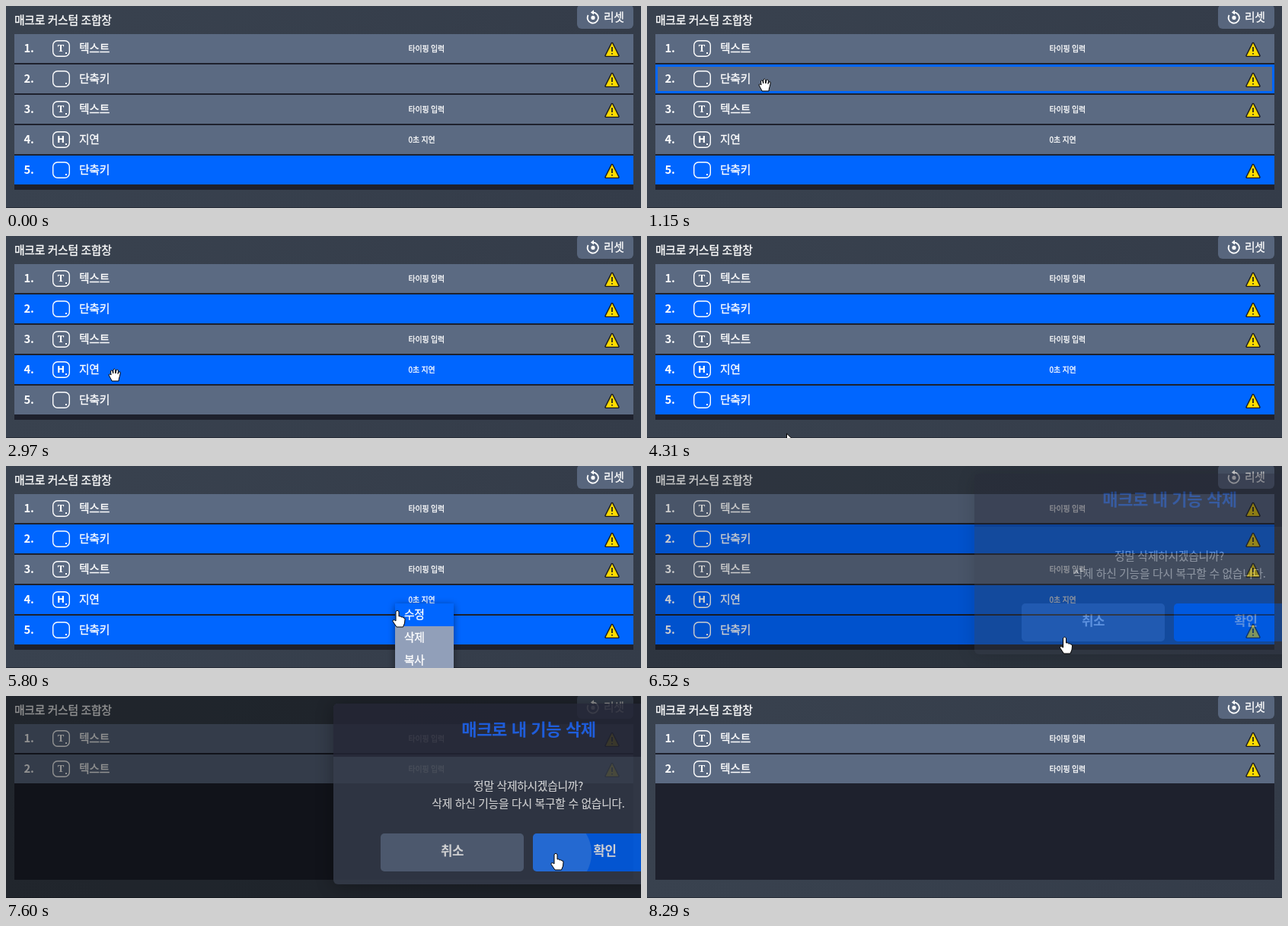
Write an HTML page that moves like this. It is 834 px wide and 266 px high and loops after 8.82 s.

```html
<!DOCTYPE html>
<html lang="ko">
<head>
<meta charset="utf-8">
<style>
  html, body { margin: 0; width: 100%; height: 100%; overflow: hidden; background: #38404d; }
  svg { display: block; width: 834px; height: 266px; }
  text {
    font: 500 14.8px "Noto Sans CJK KR", "Noto Sans CJK", "Noto Sans", sans-serif;
    letter-spacing: -.02em; fill: #fff; stroke: #fff; stroke-width: .3px;
  }
  .bold { font-weight: 700; stroke: none; }
  .small { font-size: 9.9px; letter-spacing: -.01em; }
  .plain { stroke-width: .12px; }
  .key { font-size: 13px; letter-spacing: 0; font-weight: 700; text-anchor: middle; stroke: none; }
  .serif { font-family: "Noto Serif", serif; }
  .sans { font-family: "DejaVu Sans", sans-serif; font-size: 12px; }
  .mid { text-anchor: middle; }
  .heading { font-size: 22.1px; fill: #1a66ff; }
  .button { font-size: 16.8px; }
  #menu { filter: drop-shadow(0 2px 5px rgba(0, 0, 0, .45)); }
  #dialog { filter: drop-shadow(0 2px 12px rgba(0, 0, 0, .4)); }
  #cursor path { fill: #fff; stroke: #000; stroke-linejoin: round; }
</style>
</head>
<body>
<svg viewBox="0 0 834 266">
  <defs>
    <linearGradient id="back">
      <stop stop-color="#39424f"/><stop offset="1" stop-color="#343c49"/>
    </linearGradient>
    <clipPath id="okClip"><rect x="692" y="181" width="188" height="50" rx="5"/></clipPath>
    <g id="warning">
      <path d="M796 49.4 L804 65.4 H788Z" fill="#ffdc00" stroke="#15171e" stroke-width="3.4" stroke-linejoin="round"/>
      <path d="M796 49.4 L804 65.4 H788Z" fill="#ffdc00" stroke="#ffdc00" stroke-width=".6" stroke-linejoin="round"/>
      <path d="M796 54 V60 M796 62 V63.6" stroke="#15171e" stroke-width="1.7"/>
    </g>
  </defs>

  <rect width="834" height="266" fill="url(#back)"/>
  <rect y="265" width="834" height="1" fill="#272d38"/>
  <text x="11" y="23.7">매크로 커스텀 조합창</text>
  <rect x="750" y="-2" width="74" height="32" rx="6" fill="#58667d"/>
  <g fill="none" stroke="#fff" stroke-width="1.8">
    <path d="M764.6 12 A7.1 7.1 0 1 0 771 8.4"/>
    <path d="M772 5.2 V11.6 L767.8 8.4Z" fill="#fff" stroke="none"/>
    <circle cx="771" cy="15.4" r="2.6" fill="#fff" stroke="none"/>
  </g>
  <text x="785" y="20">리셋</text>
  <rect x="11" y="37" width="813" height="205" fill="#1e212d"/>
  <g id="before"></g>
  <g id="after"></g>

  <g id="menu">
    <rect x="511" y="181" width="77" height="100" fill="#919fb9"/>
    <rect id="menuHover" x="511" width="77" height="30" fill="#0066ff"/>
    <text x="523" y="201">수정</text>
    <text x="523" y="231">삭제</text>
    <text x="523" y="261">복사</text>
  </g>

  <rect id="shade" width="834" height="266"/>
  <g id="dialog">
    <rect x="430" y="10" width="514" height="238" rx="6" fill="#363d4c"/>
    <path d="M430 80 V16 Q430 10 436 10 H944 V80Z" fill="#242636"/>
    <text class="bold mid heading" x="686.5" y="51.5">매크로 내 기능 삭제</text>
    <text class="mid plain" x="686" y="124">정말 삭제하시겠습니까?</text>
    <text class="mid plain" x="686" y="147">삭제 하신 기능을 다시 복구할 수 없습니다.</text>
    <rect x="492" y="181" width="188" height="50" rx="5" fill="#5b6a82"/>
    <rect x="692" y="181" width="188" height="50" rx="5" fill="#0066ff"/>
    <circle id="ripple" cx="719" cy="207" fill="#fff" opacity=".16" clip-path="url(#okClip)"/>
    <text class="bold mid button" x="586" y="210.3">취소</text>
    <text class="bold mid button" x="786.5" y="210.3">확인</text>
  </g>

  <g id="cursor">
    <path id="grab" d="M-4 8 C-5 5 -8 1 -8 -.5 Q-7 -2 -5 0 L-5.5 -5 Q-4.5 -7.5 -3 -5 L-2.3 -2 L-2 -7 Q-.6 -9 .6 -7 L.8 -2 L2 -6.5 Q3.6 -8 4.5 -6 L4 -1.5 L5.2 -4 Q7 -5 7.2 -3 C7 1 5 4 5 8Z"/>
    <path id="point" d="M-4 -9.5 Q-2 -12 0 -9.5 L0 -3 Q2 -4 3.2 -2 Q5 -3 6 -1 Q8.5 -1.5 8 1 L7.5 6 L5.5 11 H-3 L-8 3.5 Q-8 0 -4 3Z"/>
    <path id="arrow" d="M-2 -11 V5 L2 1.5 L5 8 L7.5 7 L4.5 .5 H10Z"/>
  </g>
</svg>
<script>
const LOOP = 8820, TICK = 67.4, LEAD = 18;
const $ = id => document.getElementById(id);
const show = (el, on) => { el.style.display = on ? '' : 'none'; };
const ramp = (k, from, to) => Math.min(1, Math.max(0, (k - from) / (to - from)));
const easeOut = u => u * (2 - u);

const TEXT = { key: 'T', face: 'serif', name: '텍스트', note: '타이핑 입력', warn: true };
const HOTKEY = { key: '', face: '', name: '단축키', note: '', warn: true };
const DELAY = { key: 'H', face: 'sans', name: '지연', note: '0초 지연', warn: false };

const rowMarkup = ({ key, face, name, note, warn }, i) => `
  <g transform="translate(0 ${i * 40})">
    <rect x="11" y="37" width="813" height="38" fill="#5b6a82"/>
    <rect class="selected" x="11" y="37" width="813" height="38" fill="#0066ff" opacity="0"/>
    <rect class="hover" x="12.5" y="38.5" width="810" height="35" fill="none" stroke="#0066ff" stroke-width="3" style="display:none"/>
    <text class="bold" x="23.5" y="60.7">${i + 1}.</text>
    <rect x="61.7" y="45.7" width="21.6" height="20.6" rx="6" fill="none" stroke="#fff" stroke-width="1.4"/>
    <text class="key ${face}" x="72" y="60.3">${key}</text>
    <rect x="78" y="61" width="2" height="2" fill="#fff"/>
    <text x="96" y="60.7">${name}</text>
    <text class="small" x="528.5" y="59.7">${note}</text>
    ${warn ? '<use href="#warning"/>' : ''}
  </g>`;

$('before').innerHTML = [TEXT, HOTKEY, TEXT, DELAY, HOTKEY].map(rowMarkup).join('');
$('after').innerHTML = [TEXT, TEXT].map(rowMarkup).join('');
const selected = [...$('before').querySelectorAll('.selected')];
const hover = [...$('before').querySelectorAll('.hover')];

// Cursor glides in ticks: the pointer rests between them.
const GLIDES = [
  { from: 2, to: 12, x: 181, y: 79 },
  { from: 13, to: 17, x: 155, y: 104 },
  { from: 33, to: 40, x: 143, y: 183 },
  { from: 44, to: 52, x: 135, y: 217 },
  { from: 59, to: 66, x: 190, y: 276 },
  { from: 69, to: 70, x: 647, y: 198 },
  { from: 70, to: 72, x: 575, y: 188 },
  { from: 73, to: 80, x: 504, y: 175 },
  { from: 81, to: 82, x: 516, y: 201 },
  { from: 86, to: 92, x: 550.5, y: 236 },
  { from: 99, to: 107, x: 724, y: 218 },
  { from: 118, to: 123, x: 752, y: 280 }
];

const cursorAt = k => GLIDES.reduce((p, g) => {
  const u = easeOut(ramp(k, g.from, g.to));
  return { x: p.x + (g.x - p.x) * u, y: p.y + (g.y - p.y) * u };
}, { x: 608, y: 256 });

function draw(now) {
  const k = Math.floor((now % LOOP + LEAD) / TICK);
  const { x, y } = cursorAt(k);
  const visible = k >= 2 && y < 276;
  const kind = k >= 115 || (k < 82 && y > 242) ? 'arrow' : k >= 82 ? 'point' : 'grab';

  show($('cursor'), visible);
  $('cursor').setAttribute('transform', `translate(${x} ${y})`);
  for (const id of ['grab', 'point', 'arrow']) show($(id), id === kind);

  show($('before'), k < 113);
  show($('after'), k >= 113);
  const over = visible && kind === 'grab' ? Math.floor((y - 36) / 40) : -1;
  hover.forEach((el, i) => show(el, i === over));

  const firstClick = ramp(k, 29, 31);
  selected[1].setAttribute('opacity', firstClick);
  selected[3].setAttribute('opacity', ramp(k, 42, 44));
  selected[4].setAttribute('opacity', k < 59 ? 1 - firstClick : 1);

  show($('menu'), k >= 82 && k < 95);
  $('menuHover').setAttribute('y', y < 222 ? 181 : 211);

  const fade = ramp(k, 95, 100.5) * (1 - ramp(k, 112.5, 115));
  show($('dialog'), fade > 0);
  $('dialog').setAttribute('opacity', fade);
  $('shade').setAttribute('opacity', fade * .54);
  $('ripple').setAttribute('r', 50 * easeOut(ramp(k, 110, 113)));
}

const start = performance.now();
function loop() {
  draw(performance.now() - start);
  requestAnimationFrame(loop);
}
loop();
</script>
</body>
</html>
```
